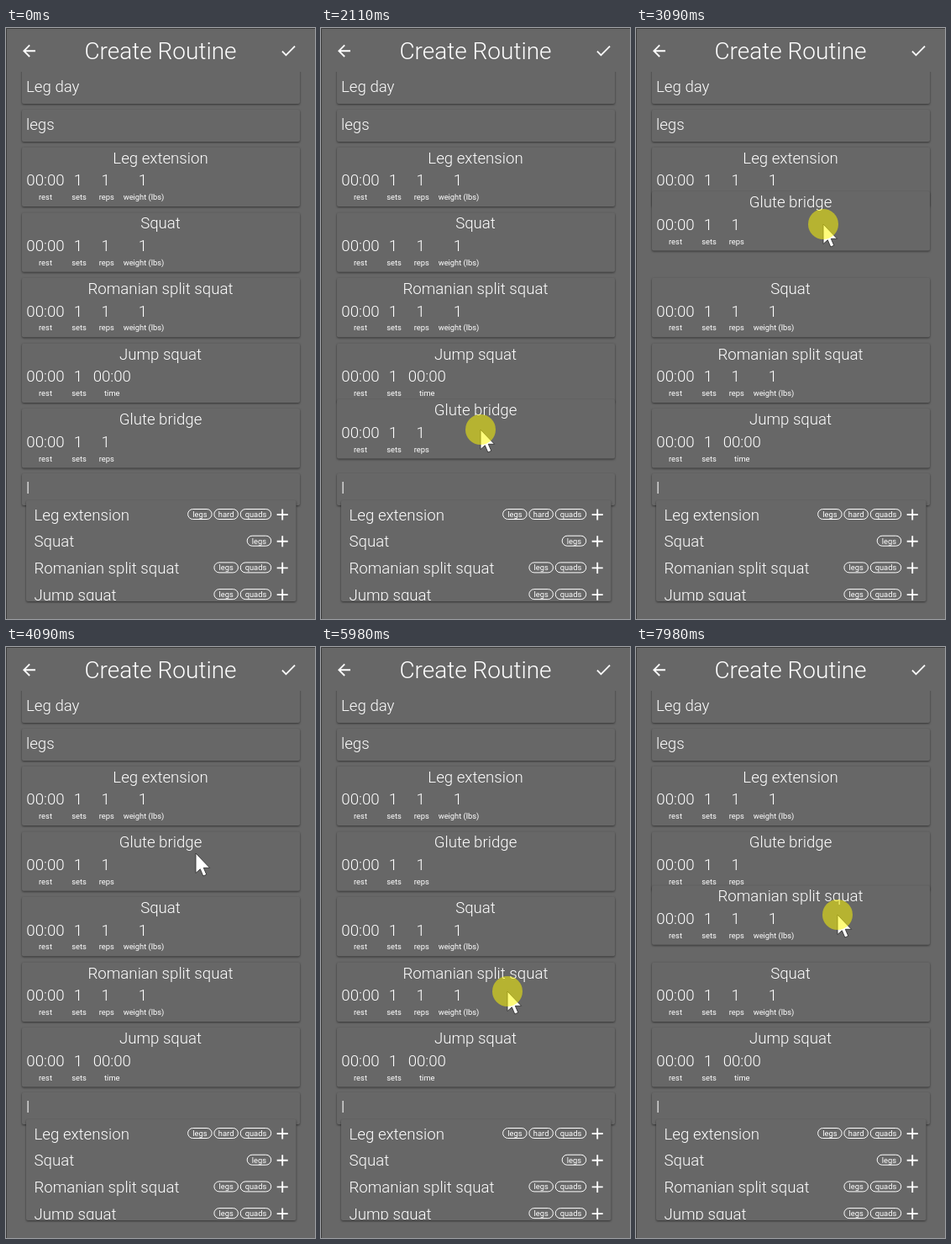
Animation of 368 by 702 pixels, one loop 8 s. Source, as an HTML page:

```html
<!DOCTYPE html>
<html lang="en">
<head>
<meta charset="utf-8">
<title>Create Routine</title>
<style>
  html, body { margin: 0; width: 100%; height: 100%; overflow: hidden; background: #676767; }
  svg { display: block; width: 368px; height: 702px; }
  text { font: 300 18.67px Roboto, sans-serif; fill: #fff; white-space: pre; }
  .heading { font-size: 28px; }
  .small { font-size: 9.33px; font-weight: 400; }
  .mid { text-anchor: middle; }
  .card { fill: #676767; filter: drop-shadow(0 1.5px 1.3px rgba(0, 0, 0, .5)); }
  .icon { fill: #fff; }
  .pill { fill: none; stroke: #fff; }
</style>
</head>
<body>
<svg viewBox="0 0 368 702">
  <defs><clipPath id="panelClip"><rect x="24" y="561" width="322" height="119"/></clipPath></defs>
  <rect width="368" height="702" fill="#676767"/>
  <g id="fields"></g>
  <g id="list"></g>
  <g id="panel"></g>
  <g id="header"></g>
  <path d="M.5 702V.5H368" fill="none" stroke="#3c3c3c"/>
  <g id="pointer">
    <path d="M0 0V23.5L5.3 18.8L8.8 27L12.8 25.3L9.3 17.3H16.6Z" fill="#fff" stroke="#333" stroke-width=".9"/>
    <circle id="press" r="18" fill="rgb(255,250,0)"/>
  </g>
</svg>
<script>
const LOOP = 8000, STEP = 70, PITCH = 77.65, LAG = 70, SHIFT = 200;
const $ = id => document.getElementById(id);

const text = (x, y, s, cls = '') => `<text x="${x}" y="${y}" class="${cls}">${s}</text>`;
const card = (x, y, w, h) => `<rect class="card" x="${x}" y="${y}" width="${w}" height="${h}" rx="2"/>`;
const icon = (x, y, d) => `<path class="icon" transform="translate(${x} ${y}) scale(.933)" d="${d}"/>`;

$('header').innerHTML = '<rect width="368" height="52" fill="#676767"/>' +
  icon(16.3, 16, 'M20 11H7.83l5.59-5.59L12 4l-8 8 8 8 1.41-1.41L7.83 13H20z') +
  text(184, 37, 'Create Routine', 'heading mid') +
  icon(325.1, 15.8, 'M9 16.17L4.83 12l-1.42 1.41L9 19 21 7l-1.41-1.41z');

$('fields').innerHTML = [['Leg day', 46, 90, 76], ['legs', 97, 135, 121], ['l', 529, 567, 553]]
  .map(([s, top, bottom, base]) => card(19, top, 331, bottom - top) + text(24, base, s)).join('');

// Exercise cards
const rest = [47, '00:00', 'rest'], sets = [87, '1', 'sets'], reps = [119.7, '1', 'reps'];
const weight = [164, '1', 'weight (lbs)'], time = [126.3, '00:00', 'time'];
const exercises = [
  ['Leg extension', rest, sets, reps, weight],
  ['Squat', rest, sets, reps, weight],
  ['Romanian split squat', rest, sets, reps, weight],
  ['Jump squat', rest, sets, time],
  ['Glute bridge', rest, sets, reps],
];
$('list').innerHTML = exercises.map(([name, ...columns]) => '<g>' +
  card(19, 141.5, 331, 70.5) + text(184, 160.7, name, 'mid') +
  columns.map(([x, value, label]) =>
    text(label === 'time' || label === 'rest' ? x : x - 1, 187.3, value, 'mid') +
    text(x, 204, label, 'small mid')).join('') + '</g>').join('');
const cards = [...$('list').children];

// Suggestions
const pills = { legs: 28.5, hard: 28.5, quads: 36.5 };
const suggestions = [['Leg extension', 'legs', 'hard', 'quads'], ['Squat', 'legs'],
  ['Romanian split squat', 'legs', 'quads'], ['Jump squat', 'legs', 'quads']];
$('panel').innerHTML = card(24, 561, 321.5, 120) + '<g clip-path="url(#panelClip)">' +
  suggestions.map(([name, ...tags], i) => {
    const y = 578 + i * 31.7;
    let right = 315.7;
    const chips = tags.reverse().map(tag => {
      const w = pills[tag], x = right - w;
      right = x - 2.8;
      return `<rect class="pill" x="${x}" y="${y - 6.5}" width="${w}" height="12" rx="6"/>` +
        text(x + w / 2, y + 2.8, tag, 'small mid');
    }).join('');
    return text(33.5, y + 6.7, name) + chips +
      icon(318, y - 11.2, 'M19 13h-6v6h-2v-6H5v-2h6V5h2v6h6z');
  }).join('') + '</g>';

// Motion: [time, x, y] for the pointer, [time, opacity] for the press mark
const path = [
  [200, 342, 690], [580, 235, 545], [960, 183, 493], [1020, 182, 493], [1700, 182, 493],
  [2040, 188, 482], [2110, 190, 477], [2460, 202, 358], [2740, 213, 284], [3020, 222, 235],
  [3090, 223, 233], [3600, 225, 232], [3850, 226, 239], [4050, 226, 245], [4230, 226, 245],
  [4600, 260, 224], [4800, 276, 250], [5000, 264, 292], [5400, 240, 365], [5780, 222, 409],
  [6380, 222, 409], [6800, 226, 395], [6930, 231, 362], [7000, 233, 342], [7140, 236, 324],
  [7400, 239, 315], [7980, 240, 318],
];
const pressKeys = [[1170, 0], [1270, 1], [3850, 1], [3990, 0], [5860, 0], [5960, 1]];
const drags = [
  { card: 4, start: 1700, end: 3850, fromY: 493, slots: -3, pushes: [[3, 2247], [2, 2472], [1, 2756]] },
  { card: 2, start: 6380, end: Infinity, fromY: 409, slots: -1, pushes: [[1, 6925]] },
];

function at(keys, t) {
  const i = keys.findIndex(k => k[0] > t);
  if (i === 0) return keys[0].slice(1);
  if (i < 0) return keys[keys.length - 1].slice(1);
  const [a, b] = [keys[i - 1], keys[i]];
  const p = (t - a[0]) / (b[0] - a[0]);
  return a.slice(1).map((v, j) => v + (b[j + 1] - v) * p);
}

function ease(p) {
  p = Math.min(1, Math.max(0, p));
  return p * p * (3 - 2 * p);
}

function dragOffset(drag, t) {
  if (t < drag.start) return 0;
  const held = at(path, Math.min(t, drag.end) - LAG)[1] - drag.fromY;
  return held + (drag.slots * PITCH - held) * ease((t - drag.end) / SHIFT);
}

function render(t) {
  const offsets = cards.map((_, i) => i * PITCH);
  for (const drag of drags) {
    offsets[drag.card] += dragOffset(drag, t);
    for (const [i, start] of drag.pushes) offsets[i] += PITCH * ease((t - start) / SHIFT);
  }
  cards.forEach((el, i) => el.setAttribute('transform', `translate(0 ${offsets[i].toFixed(2)})`));

  const top = cards[t < 5000 ? 4 : 2];
  if ($('list').lastElementChild !== top) $('list').append(top);

  const [x, y] = at(path, t);
  $('pointer').setAttribute('transform', `translate(${x} ${y})`);
  $('pointer').style.display = t < 200 ? 'none' : '';
  $('press').setAttribute('opacity', at(pressKeys, t)[0] * .52);
}

function tick() {
  const t = performance.now() % LOOP;
  render(Math.floor(t / STEP) * STEP + 10);
  requestAnimationFrame(tick);
}
tick();
</script>
</body>
</html>
```
